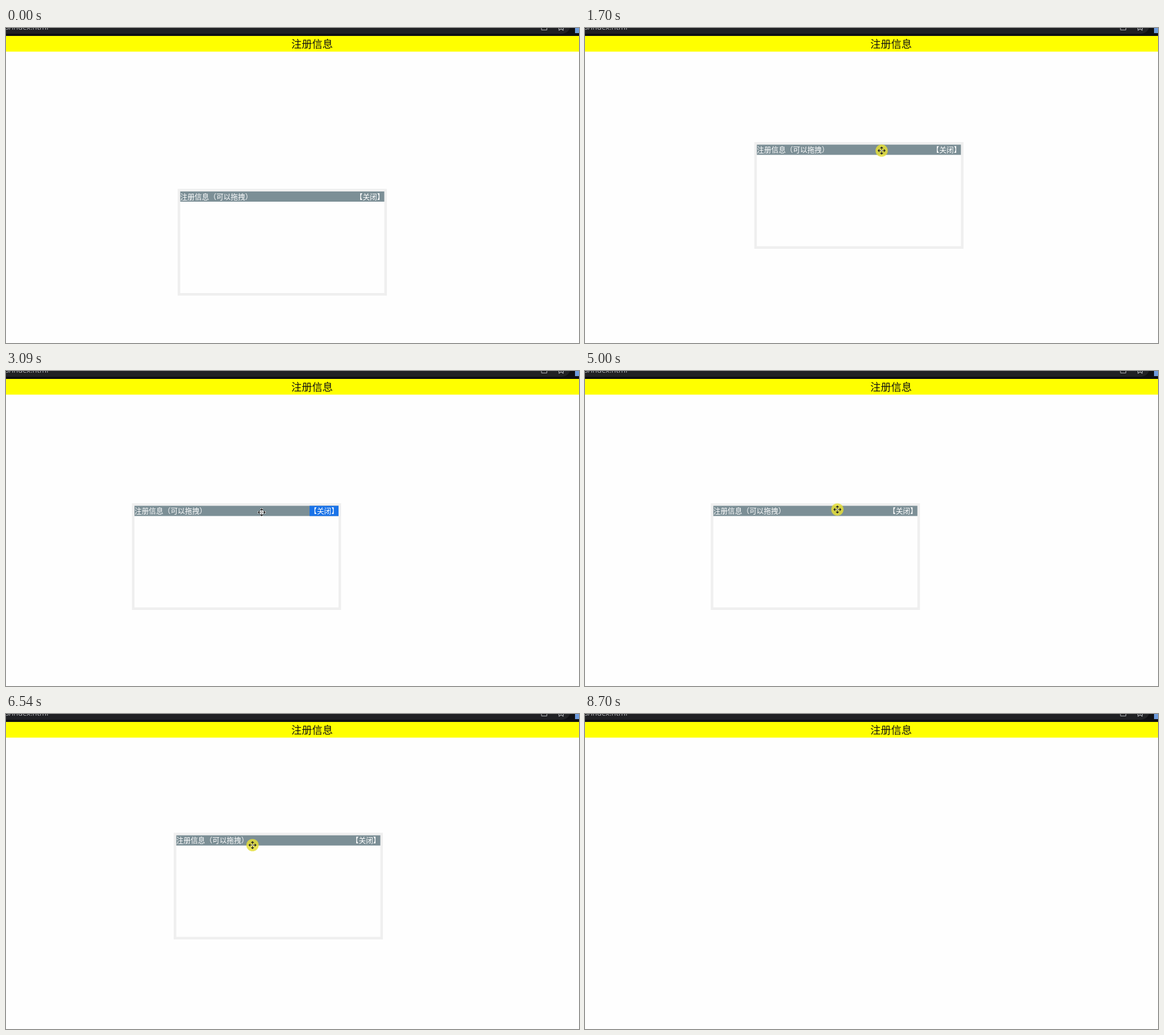
Recreate the animation shown at these times as an HTML page. Size 1008 by 555 pixels, loop 9.3 s.

```html
<!DOCTYPE html>
<html lang="zh-CN">
<head>
<meta charset="utf-8">
<style>
  html, body { margin: 0; width: 100%; height: 100%; overflow: hidden; background: #fefefe; }
  svg { display: block; }
  text { font-family: "Noto Sans CJK SC", "Noto Sans CJK", sans-serif; text-spacing-trim: space-all; }
</style>
</head>
<body>
<svg width="1008" height="555">
  <rect width="1008" height="14" fill="#0f1013"/>
  <rect x="-40" y="-20" width="1033" height="30" rx="15" fill="#202124"/>
  <text x="-1" y="3" style="font: 13px 'Open Sans', 'Noto Sans', sans-serif" fill="#b4b6ba">s/index.html</text>
  <path d="M942-2V3.500H951.500V0M945-1L950-4" fill="none" stroke="#b4b6ba"/>
  <path d="M972-4L973 4L976.500 1.500L980 4L981-4" fill="none" stroke="#b4b6ba" stroke-width="1.200"/>
  <rect x="1001" width="7" height="9" fill="#6c9bdc"/>

  <rect y="14" width="1008" height="27.600" fill="#ff0"/>
  <text x="538.500" y="35" font-size="18.200" text-anchor="middle" fill="#111">注册信息</text>

  <g id="dialog" font-size="12.700" fill="#fff">
    <rect width="368" height="188" fill="#efefef"/>
    <rect x="4.500" y="4.500" width="359" height="179" fill="#fefefe"/>
    <rect x="4.500" y="4.500" width="359" height="18" fill="#7c8f96"/>
    <rect id="selection" x="312.500" y="4.500" width="51" height="18" fill="#1a73e8"/>
    <text x="4.500" y="18">注册信息（可以拖拽）</text>
    <text x="363.500" y="18" text-anchor="end">【关闭】</text>
  </g>

  <g id="cursor">
    <circle id="press" r="10.800" fill="#e4de38" fill-opacity=".85"/>
    <path id="halo" d="M-7 0H7M0-7V7" stroke="#fff" stroke-width="4"/>
    <g id="move" fill="#222">
      <path d="M-7 0l3-3v6zM7 0l-3-3v6zM0-7l-3 3h6zM0 7l-3-3h6z"/>
      <path d="M-5 0H5M0-5V5" stroke="#222"/>
      <rect x="-1.500" y="-1.500" width="3" height="3" fill="#fff" fill-opacity=".6"/>
    </g>
    <path id="arrow" d="M0 0V11.500L2.700 9L4.500 13L6.300 12.200L4.600 8.300H8.200Z" fill="#fff" stroke="#222" stroke-width=".8"/>
    <path id="hand" d="M-1 0q1-1 2 0v5l5 1.200q1 .4 1 1.600l-1 6h-6l-4-5.500q0-1.500 1.500-.8l1.500 1z" fill="#fff" stroke="#222" stroke-width=".8"/>
  </g>
</svg>
<script>
const LOOP = 9300, LAG = 65, CLOSED = 7660;
const HOME = [302, 283.5];

// Key points of the pointer: [time, x, y]
const pointerPath = [
  [130, 955, 531], [820, 535, 297], [1040, 535, 297], [1105, 543, 285], [1170, 548, 279],
  [1400, 594, 232], [1635, 531, 214.5], [1700, 522, 216], [2000, 466, 228], [2130, 475, 254],
  [2350, 462.5, 235], [2650, 535, 306], [2950, 459, 237.5], [3025, 451, 249], [3500, 446, 249],
  [4200, 577, 240], [4860, 444, 244], [5100, 444, 244], [5500, 640, 241], [5810, 653, 166],
  [6070, 641, 241], [6340, 641, 241], [6400, 600, 194], [6475, 520, 220], [6540, 434, 231],
  [6900, 367, 228], [7500, 480, 238], [7800, 480, 238], [8300, 980, 42], [8660, 995, 560]
];
const drags = [[1020, 2350], [2950, 3025], [3400, 3500], [4930, 5500], [6270, 6900]];
const clicks = [[2600, 2720], [7560, CLOSED]];

const el = id => document.getElementById(id);
const show = (id, on) => { el(id).style.display = on ? '' : 'none'; };
const within = (t, spans) => spans.some(([from, to]) => t >= from && t < to);
const clamp = (v, lo, hi) => Math.min(Math.max(v, lo), hi);

function slope(i, axis) {
  const a = pointerPath[i], b = pointerPath[i + 1];
  return a && b ? (b[axis] - a[axis]) / (b[0] - a[0]) : 0;
}

// Harmonic mean keeps the curve from overshooting at turns and rests
function tangent(i, axis) {
  const before = slope(i - 1, axis), after = slope(i, axis);
  return before * after > 0 ? 2 * before * after / (before + after) : 0;
}

function pointer(time) {
  const t = clamp(time, pointerPath[0][0], pointerPath.at(-1)[0]);
  const i = Math.max(0, pointerPath.findIndex(key => key[0] >= t) - 1);
  const a = pointerPath[i], b = pointerPath[i + 1];
  const span = b[0] - a[0], k = (t - a[0]) / span, ease = k * k * (3 - 2 * k);
  return [1, 2].map(axis => a[axis] + (b[axis] - a[axis]) * ease
    + span * k * (1 - k) * ((1 - k) * tangent(i, axis) - k * tangent(i + 1, axis)));
}

// The dialog trails the pointer during every drag
function dialogAt(t) {
  return drags.reduce((position, [from, to]) => {
    const grabbed = pointer(from), now = pointer(clamp(t - LAG, from, to));
    return position.map((p, axis) => p + now[axis] - grabbed[axis]);
  }, HOME);
}

function cursorKind(dx, dy, open, dragging) {
  if (dragging) return 'move';
  const onHeader = open && dx >= 4.5 && dx < 363.5 && dy >= 4.5 && dy < 22.5;
  if (!onHeader) return 'arrow';
  return dx > 312.5 ? 'hand' : 'move';
}

function render(t) {
  const [x, y] = pointer(t), [left, top] = dialogAt(t);
  const open = t < CLOSED, dragging = within(t, drags);
  const pressed = dragging || within(t, clicks);
  const kind = cursorKind(x - left, y - top, open, dragging);
  el('dialog').setAttribute('transform', `translate(${left} ${top})`);
  el('cursor').setAttribute('transform', `translate(${x} ${y})`);
  show('dialog', open);
  show('selection', t >= 3020 && t < 3400);
  show('cursor', t >= 130 && t < 8660);
  show('press', pressed);
  show('halo', kind === 'move' && !pressed);
  for (const id of ['move', 'arrow', 'hand']) show(id, id === kind);
}

const start = performance.now();
function frame() {
  render((performance.now() - start) % LOOP);
  requestAnimationFrame(frame);
}
frame();
</script>
</body>
</html>
```
